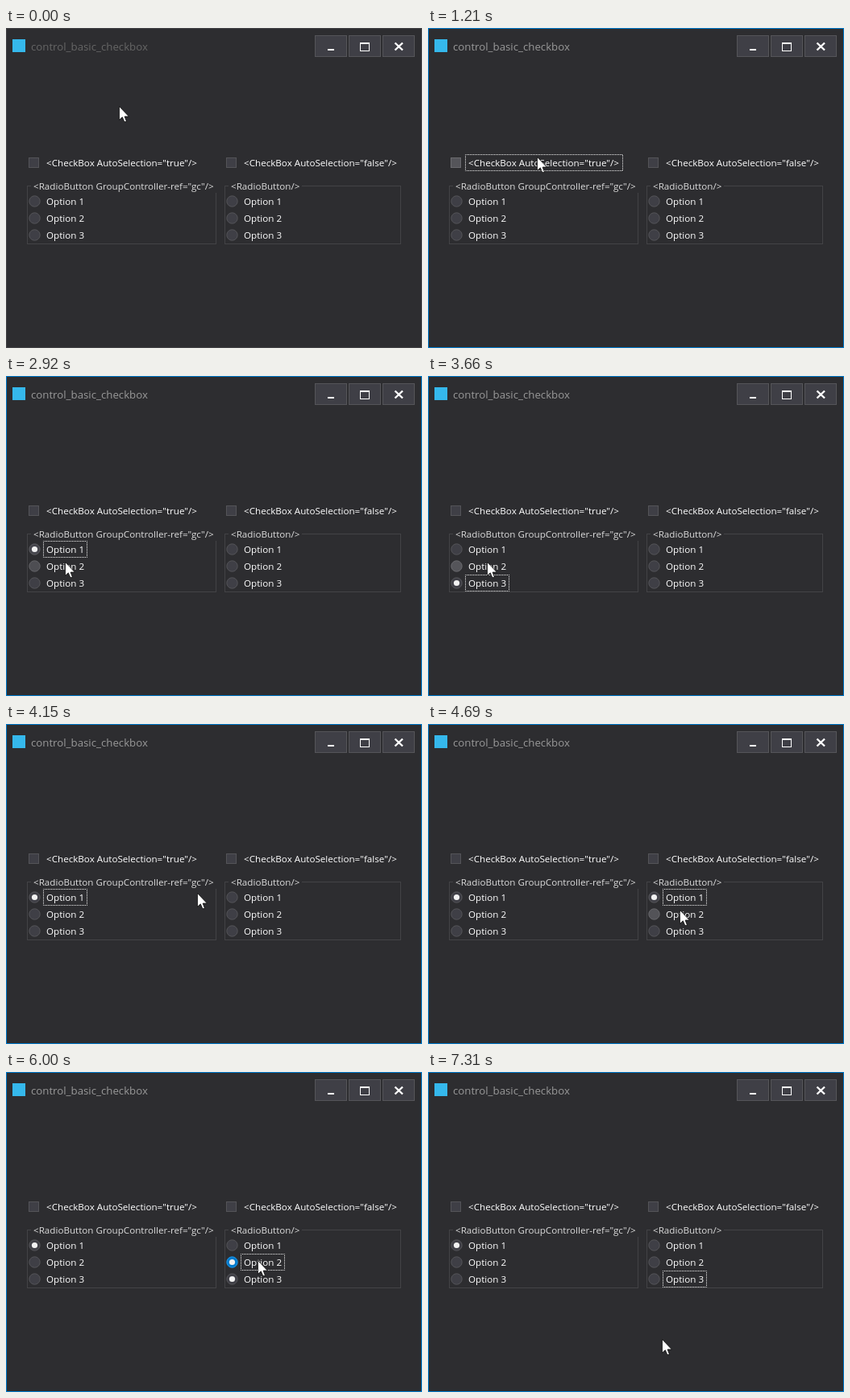
These frames come from a looping animation (516x398 px, 7.5 s). An HTML page:

```html
<!DOCTYPE html>
<html lang="en">
<head>
<meta charset="utf-8">
<title>control_basic_checkbox</title>
<style>
html, body { margin: 0; width: 100%; height: 100%; overflow: hidden; background: #2d2d30; }
svg { display: block; width: 516px; height: 398px; }
text { font: 11.65px "Open Sans", "Noto Sans", sans-serif; fill: #fff; white-space: pre; }
.caption { font-size: 13.25px; }
.legend { fill: #dcdcdc; }
.line { fill: none; stroke: #434346; }
.focus { fill: none; stroke: #f1f1f1; stroke-dasharray: 1 1; stroke-dashoffset: .5; }
</style>
</head>
<body>
<svg id="stage" viewBox="0 0 516 398"></svg>
<script>
const LOOP = 7500, FADE = 90, ROW = 21;
const stage = document.getElementById('stage');

function add(tag, attrs, text) {
  const el = document.createElementNS('http://www.w3.org/2000/svg', tag);
  for (const k in attrs) el.setAttribute(k, attrs[k]);
  if (text) el.textContent = text;
  return stage.appendChild(el);
}

// Window frame and caption
const frame = add('rect', { x: .5, y: .5, width: 515, height: 397, fill: '#2d2d30' });
add('rect', { x: 8, y: 14, width: 16, height: 16, fill: '#35b8ec' });
const caption = add('text', { x: 31, y: 28, class: 'caption' }, 'control_basic_checkbox');
for (let i = 0; i < 3; i++)
  add('rect', { x: 383.5 + 42 * i, y: 9.5, width: 39, height: 26, fill: '#3f3f46', stroke: '#555559' });
add('path', { d: 'M399 26h8v2h-8z', fill: '#fff' });
add('path', { d: 'M439 18h12v11h-12zM440 20v8h10v-8z', fill: '#fff', 'fill-rule': 'evenodd' });
add('path', { d: 'M482.5 18.5l9.5 9m0-9l-9.5 9', stroke: '#fff', 'stroke-width': 2.4 });

// The legend covers the top border, and the corner where it is wide.
function group(x, width, legendWidth, text) {
  add('rect', { class: 'line', x: x + .5, y: 196.5, width, height: 72 });
  add('rect', { x: x + 5, y: 188, width: legendWidth, height: 17, fill: '#2d2d30' });
  add('text', { x: x + 8, y: 201, class: 'legend' }, text);
}
group(26, 234, 231, '<RadioButton GroupController-ref="gc"/>');
group(271, 218, 91, '<RadioButton/>');

// mode: 'toggle' flips, 'group' is exclusive, 'fixed' never changes
const items = [];
function item(round, mode, x, y, right, aim, label) {
  const cx = x + 7.5, cy = y + 10.5;
  const mark = round
    ? add('circle', { cx, cy, r: 6.7 })
    : add('rect', { x: x + .5, y: y + 4.5, width: 12, height: 12 });
  const tick = round
    ? add('circle', { cx, cy, r: 3.6, fill: '#f1f1f1' })
    : add('path', { d: `M${x + 3} ${y + 10}l3 3.5 5-7`, fill: 'none', stroke: '#f1f1f1', 'stroke-width': 2 });
  add('text', { x: x + 22, y: y + 15 }, label);
  const focus = add('rect', { class: 'focus', x: x + 18.5, y: y + .5, width: right - x - 18, height: ROW - 1 });
  items.push({ mode, x, y, right, aim, mark, tick, focus });
}
item(false, 'toggle', 28, 157, 241, 135, '<CheckBox AutoSelection="true"/>');
item(false, 'fixed', 273, 157, 489, 313, '<CheckBox AutoSelection="false"/>');
for (let i = 0; i < 3; i++) item(true, 'group', 28, 205 + ROW * i, 100, 73, `Option ${i + 1}`);
for (let i = 0; i < 3; i++) item(true, 'toggle', 273, 205 + ROW * i, 345, 312, `Option ${i + 1}`);

const pointer = add('path', {
  d: 'M.5 .5V17.3L4.3 13.8 6.8 19.6H9.5L7.1 13H12.3Z', fill: '#fff', stroke: '#000', 'stroke-width': .7
});

// One visit: the pointer leaves for an item, then presses and releases it.
function visit(index, leave, down, hold = 80, dy = 5) {
  const o = items[index];
  return { o, leave, arrive: down - 100, down, up: down + hold, x: o.aim, y: o.y + dy };
}
const visits = [
  visit(0, 30, 500, 80, 3), visit(0, 920, 1020, 80, 3), visit(1, 1230, 1570),
  visit(2, 1990, 2750), visit(3, 2840, 2990), visit(4, 3050, 3180),
  visit(3, 3520, 3710), visit(2, 3790, 3900), visit(5, 3990, 4390, 180),
  visit(6, 4570, 4740), visit(7, 4820, 4940), visit(5, 5250, 5440),
  visit(6, 5620, 5890, 250, 8), visit(7, 6170, 6490, 150)
];
const moves = [
  { leave: -1, arrive: 0, x: 140, y: 97 }, ...visits, { leave: 7150, arrive: 7310, x: 290, y: 332 }
];

function place(t) {
  const i = Math.max(0, moves.findLastIndex(m => m.leave <= t));
  const to = moves[i], from = moves[i - 1] || to;
  const k = Math.min(1, (t - to.leave) / (to.arrive - to.leave));
  const e = 1 - (1 - k) ** 1.5;
  return [from.x + (to.x - from.x) * e, from.y + (to.y - from.y) * e];
}

const NORMAL = [[63, 63, 70], [84, 84, 88]];
const HOVER = [[85, 85, 90], [106, 106, 110]];
const PRESSED = [[0, 122, 204], [28, 151, 234]];
const rgb = c => `rgb(${c.map(Math.round)})`;
const mix = (a, b, k) => a.map((v, i) => v + (b[i] - v) * k);

function look(o, t) {
  if (visits.some(v => v.o === o && t >= v.down && t < v.up)) return PRESSED;
  const [x, y] = place(t);
  return x >= o.x && x <= o.right && y >= o.y && y < o.y + ROW ? HOVER : NORMAL;
}

// Averaging the recent looks gives a linear fade that depends on time alone.
function faded(o, t, part) {
  const n = 9, sum = [0, 0, 0];
  for (let i = 0; i < n; i++)
    look(o, t - FADE * i / n)[part].forEach((v, j) => sum[j] += v / n);
  return rgb(sum);
}

function selected(o, t) {
  const done = visits.filter(v => v.up <= t && v.o.mode === o.mode);
  if (o.mode === 'group') return done.at(-1)?.o === o;
  return o.mode === 'toggle' && done.filter(v => v.o === o).length % 2 === 1;
}

function draw(t) {
  const k = Math.max(0, Math.min(1, (t - visits[0].down) / 120));
  frame.setAttribute('stroke', rgb(mix([67, 67, 70], [0, 122, 204], k)));
  caption.style.fill = rgb(mix([102, 102, 102], [153, 153, 153], k));
  const active = visits.findLast(v => v.down <= t)?.o;
  for (const o of items) {
    o.mark.setAttribute('fill', faded(o, t, 0));
    o.mark.setAttribute('stroke', faded(o, t, 1));
    o.tick.style.display = selected(o, t) ? '' : 'none';
    o.focus.style.display = o === active ? '' : 'none';
  }
  const [x, y] = place(t).map(Math.round);
  pointer.setAttribute('transform', `translate(${x} ${y})`);
}

const start = performance.now();
function tick(now) {
  draw(Math.max(0, now - start) % LOOP);
  requestAnimationFrame(tick);
}
draw(0);
requestAnimationFrame(tick);
</script>
</body>
</html>
```
